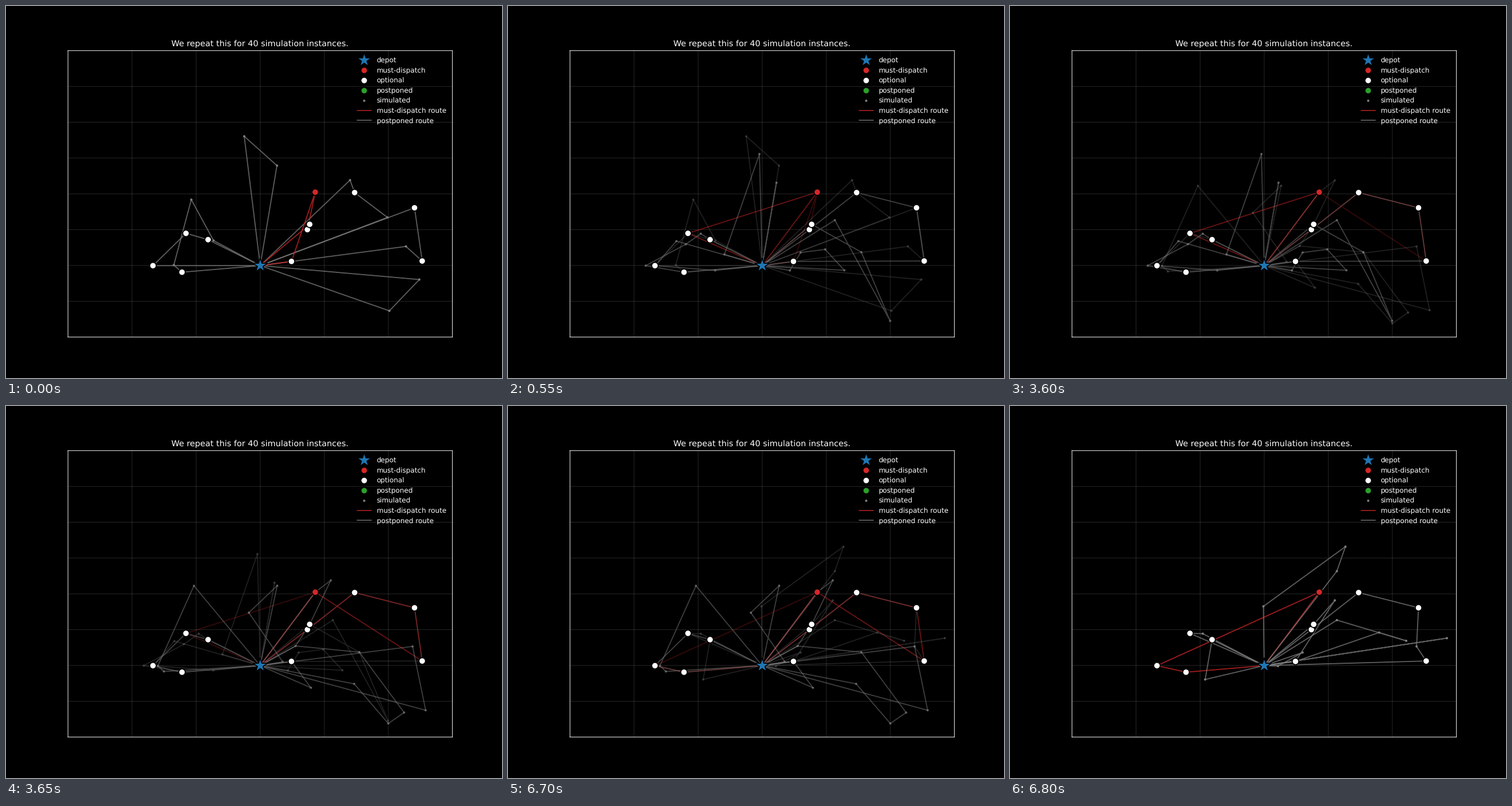
These frames come from a looping animation (864 px wide and 648 px high, 8 s). A matplotlib script:

```python
import matplotlib.pyplot as plt
import numpy as np
from matplotlib.animation import FuncAnimation

INTERVAL, FRAMES = 50, 160
FADE_STARTS, FADE_STEPS = (10, 72, 134), 3
ROUTE_ALPHA = 0.75
RED, GREY = "tab:red", "tab:grey"

plt.rcParams.update({"font.family": "DejaVu Sans", "font.size": 10,
                     "text.hinting": "none"})

DEPOT = (442.8, 452.2)
MUST = (538.7, 324.3)
OPTIONAL = {
    "A": (313.5, 396), "B": (352, 407), "C": (256, 452.3), "D": (306.6, 463.7),
    "E": (497.3, 444.9), "F": (525, 389.5), "G": (529, 380.3),
    "H": (607.3, 325), "I": (711.6, 351.5), "J": (725, 444.2),
}
CLIENTS = {**OPTIONAL, "M": MUST}

# Each route starts and ends at the depot; letters are clients, pairs are
# simulated requests. The colour says which kind of route it is.
SCENES = [
    [
        (GREY, [(415, 227), (472, 278)]),
        (GREY, ["B", "A", "C"]),
        (GREY, [(361.5, 408.5), (322.8, 337.3), (292.3, 451.3), "D"]),
        (GREY, [(599.3, 303.3), "H", (664.5, 368.3)]),
        (GREY, ["I", "J", (696.7, 418.8)]),
        (GREY, [(720, 476.5), (667.8, 531)]),
        (RED, ["G", "F", "M", "E"]),
    ],
    [
        (RED, ["A", "M"]),
        (GREY, [(438, 257.8), (377, 432.7)]),
        (GREY, [(467.7, 307.7)]),
        (GREY, ["B", (335.8, 396.6), (309.8, 415), (239.8, 452.3), "D"]),
        (GREY, [(293.3, 409.6), "C", (361, 460.6)]),
        (GREY, ["F", "H", "I", "J", "E"]),
        (GREY, ["G", (615.5, 428.8), (665.6, 548.5), (569.4, 373)]),
        (GREY, [(491, 460.7), (509.7, 429.4), (552.5, 424), (586, 460.4)]),
    ],
    [
        (RED, ["M", "J", "I", "H", "F"]),
        (GREY, ["B", "A", "C", "D"]),
        (GREY, [(327.4, 313.2), (264.6, 452.6), (275, 462.4)]),
        (GREY, [(472.4, 313), (423, 360), (482, 445.5)]),
        (GREY, ["M", (565.8, 303.7), "G", (504.5, 418)]),
        (GREY, [(504.5, 418), (615.5, 428.8), (693.5, 534), (666, 553),
                (606.5, 484)]),
        (GREY, [(708.2, 418.8), (731, 530)]),
        (GREY, ["E", (531.2, 490.8)]),
    ],
    [
        (RED, ["M", "C", "D"]),
        (GREY, ["A", (335.8, 396.6)]),
        (GREY, ["B", (340, 476.4)]),
        (GREY, [(441.4, 349), (584.3, 245), (569.4, 287.6)]),
        (GREY, ["G", (565.8, 338.6), "E"]),
        (GREY, [(509.7, 429.4), (466.8, 453)]),
        (GREY, ["F", "H", "I", (708.2, 418.8), "J"]),
        (GREY, [(569.4, 373), (690.2, 409), (643, 394.6), "E"]),
        (GREY, [(761, 404.4)]),
    ],
]

fig, ax = plt.subplots(figsize=(10, 7.5), dpi=86.4, facecolor="black")


def style_axes():
    left, right, top, bottom = 108, 777.6, 77.76, 576.72
    ax.set(facecolor="black", xlim=(left, right), ylim=(bottom, top),
           xticks=np.linspace(left, right, 7)[1:-1],
           yticks=np.linspace(top, bottom, 9)[1:-1])
    ax.tick_params(length=0, labelbottom=False, labelleft=False)
    ax.grid(color="white", alpha=0.16, linewidth=0.8, snap=False)
    ax.set_axisbelow(True)
    for spine in ax.spines.values():
        spine.set(color="white", linewidth=0.8, snap=False)
    ax.set_title("We repeat this for 40 simulation instances.", color="white")


def scatter(points, color, size, label=None, **kwargs):
    x, y = np.reshape(points, (-1, 2)).T
    # Two antialiasing entries keep Agg from rounding centres to whole pixels.
    style = dict(edgecolors="black", linewidths=1.5, zorder=5,
                 antialiaseds=(True, True)) | kwargs
    return ax.scatter(x, y, s=size, c=color, label=label, **style)


def scatter_simulated(points, label=None):
    return scatter(points, GREY, 11, label, linewidths=0, zorder=3)


def draw_route(color, stops=(), label=None):
    points = [CLIENTS.get(s, s) if isinstance(s, str) else s for s in stops]
    x, y = np.array([DEPOT, *points, DEPOT]).T if points else ([], [])
    line, = ax.plot(x, y, color=color, alpha=ROUTE_ALPHA, linewidth=1.5,
                    label=label, zorder=2, snap=False)
    return line


def draw_scene(routes):
    lines = [draw_route(color, stops) for color, stops in routes]
    simulated = {s for _, stops in routes for s in stops
                 if not isinstance(s, str)}
    return lines, scatter_simulated(sorted(simulated))


style_axes()
scenes = [draw_scene(routes) for routes in SCENES]

nowhere = (np.nan, np.nan)
handles = [
    scatter(DEPOT, "tab:blue", 500, "depot", marker="*", zorder=6),
    scatter(MUST, RED, 90, "must-dispatch"),
    scatter(list(OPTIONAL.values()), "white", 90, "optional"),
    scatter(nowhere, "tab:green", 90, "postponed"),
    scatter_simulated(nowhere, "simulated"),
    draw_route(RED, label="must-dispatch route"),
    draw_route(GREY, label="postponed route"),
]
ax.legend(handles=handles, loc="upper right", frameon=False,
          labelcolor="white")


def update(frame):
    position = sum(np.clip((frame - start + 1) / FADE_STEPS, 0, 1)
                   for start in FADE_STARTS)
    for index, (lines, dots) in enumerate(scenes):
        weight = max(0.0, 1 - abs(position - index))
        for artist in (*lines, dots):
            artist.set_visible(weight > 0)
        for line in lines:
            line.set_alpha(ROUTE_ALPHA * weight)
        dots.set_alpha(weight)
    return []


anim = FuncAnimation(fig, update, frames=FRAMES, interval=INTERVAL,
                     repeat=True, repeat_delay=0)
plt.show()
```
